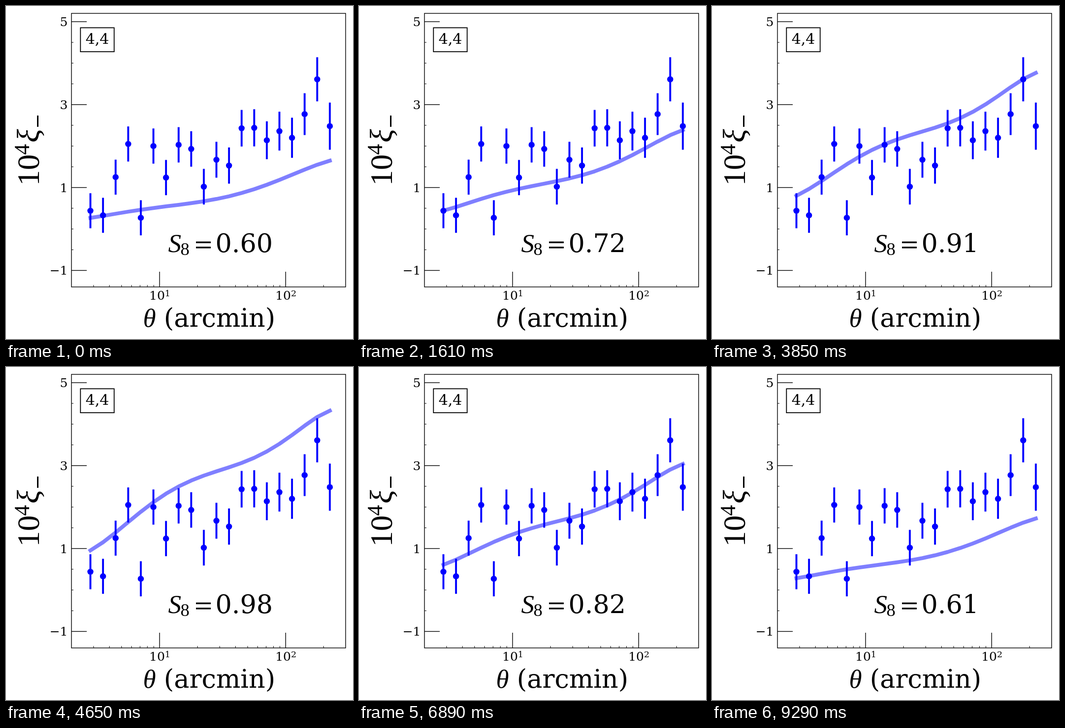
These frames come from a looping animation (705 by 678 pixels, 9450 ms). An HTML page with a canvas:

```html
<!DOCTYPE html>
<html lang="en">
<head>
<meta charset="utf-8">
<title>Correlation function against S8</title>
<style>
  html, body { margin: 0; width: 100%; height: 100%; overflow: hidden; background: #fff; }
  canvas { display: block; }
</style>
</head>
<body>
<canvas id="plot" width="705" height="678"></canvas>
<script>
const ctx = document.getElementById('plot').getContext('2d');
const SERIF = '"DejaVu Serif", serif';
const MATH = '"Liberation Serif", serif';

// Timing: a longer first step, then even steps up and back down
const LOOP = 9450, FIRST = 330, STEP = 160, STEPS = 58;
const S8_MIN = 0.6, S8_MAX = 0.99;

const BOX = { l: 133, t: 15, r: 690, b: 572 };
const xOf = theta => 312 + 256.2 * (Math.log10(theta) - 1);
const yOf = v => 454 - 84.42 * v;
const binX = i => 171.5 + 25.6 * i;
const errorBar = i => 35.6 + 12.4 * Math.exp((i - 19) / 3.5);

const data = [0.44, 0.33, 1.25, 2.05, 0.27, 2, 1.24, 2.03, 1.93, 1.02,
  1.67, 1.53, 2.43, 2.44, 2.14, 2.36, 2.2, 2.77, 3.61, 2.48];

// Model: a few key bins at three key steps, joined by polynomials
const keyBins = [0, 2, 6, 10, 14, 17, 19];
const keySteps = [0, 17, 28];
const keyCurves = [
  [0.267, 0.367, 0.545, 0.723, 1.066, 1.433, 1.647],
  [0.634, 0.912, 1.463, 1.812, 2.268, 2.819, 3.139],
  [0.954, 1.386, 2.322, 2.861, 3.34, 3.962, 4.324]
];

// Lagrange polynomial through (xs, ys), evaluated at x
function poly(xs, ys, x) {
  return ys.reduce((sum, y, j) =>
    sum + xs.reduce((p, xm, m) => m === j ? p : p * (x - xm) / (xs[j] - xm), y), 0);
}

const model = (bin, step) =>
  poly(keySteps, keyCurves.map(curve => poly(keyBins, curve, bin)), step);

function text(str, x, y, size, family = SERIF, align = 'left', style = '') {
  ctx.font = `${style} ${size}px ${family}`;
  ctx.textAlign = align;
  ctx.fillText(str, x, y);
}

function line(x1, y1, x2, y2) {
  ctx.beginPath();
  ctx.moveTo(x1, y1);
  ctx.lineTo(x2, y2);
  ctx.stroke();
}

function drawCurve(step) {
  ctx.save();
  ctx.strokeStyle = 'rgba(0,0,255,0.5)';
  ctx.lineWidth = 7.8;
  ctx.lineCap = 'square';
  ctx.lineJoin = 'round';
  ctx.beginPath();
  data.forEach((_, i) => ctx.lineTo(binX(i), yOf(model(i, step))));
  ctx.stroke();
  ctx.restore();
}

function drawPoints() {
  ctx.strokeStyle = ctx.fillStyle = '#00f';
  ctx.lineWidth = 3.9;
  data.forEach((v, i) => {
    const x = binX(i), y = yOf(v), e = errorBar(i);
    line(x, y - e, x, y + e);
    ctx.beginPath();
    ctx.arc(x, y, 6.2, 0, 2 * Math.PI);
    ctx.fill();
  });
}

function drawAxes() {
  ctx.strokeStyle = ctx.fillStyle = '#000';
  ctx.lineWidth = 1.4;
  ctx.strokeRect(BOX.l, BOX.t, BOX.r - BOX.l, BOX.b - BOX.t);

  for (let v = -1; v <= 5; v += 0.5) {
    const y = yOf(v), major = (v + 1) % 2 === 0;
    ctx.lineWidth = major ? 1.4 : 1;
    line(BOX.l, y, BOX.l + (major ? 31 : 4), y);
    if (major) text(String(v).replace('-', '\u2212'), 125.5, y + 9, 25, SERIF, 'right');
  }
  for (const decade of [1, 10, 100]) {
    for (let m = 1; m < 10; m++) {
      const theta = m * decade;
      if (theta < 3 || theta > 200) continue;
      const x = xOf(theta), major = m === 1;
      ctx.lineWidth = major ? 1.4 : 1;
      line(x, BOX.b, x, BOX.b - (major ? 31 : 4));
      if (major) {
        text('10', x - 21, 598, 25);
        text(String(Math.log10(theta)), x + 10.8, 590.5, 17.5);
      }
    }
  }
}

function drawLabels(s8) {
  ctx.lineWidth = 1.8;
  ctx.strokeRect(151.3, 44.3, 68.4, 48.8);
  text('4,4', 185.6, 77, 30, SERIF, 'center');

  text('S', 329.5, 500.5, 53, MATH, 'left', 'italic');
  text('8', 354.5, 507, 36.5, MATH);
  ctx.fillRect(386, 479.5, 30, 3.4);
  ctx.fillRect(386, 490, 30, 3.4);
  text(s8.toFixed(2), 425.5, 500.5, 52.3);

  text('\u03b8', 278.5, 653, 53, MATH, 'left', 'italic');
  text('(arcmin)', 320.8, 653, 52.3);

  ctx.save();
  ctx.translate(67, 366);
  ctx.rotate(-Math.PI / 2);
  text('10', 0, 0, 64, MATH);
  text('4', 63, -20.5, 44, MATH);
  text('\u03be', 88, 0, 64, MATH, 'left', 'italic');
  ctx.fillRect(120, -4, 23, 3);
  ctx.restore();
}

function draw(now) {
  const t = now % LOOP;
  const n = t < FIRST ? 0 : 1 + Math.floor((t - FIRST) / STEP);
  const step = Math.min(n, STEPS - n);
  ctx.fillStyle = '#fff';
  ctx.fillRect(0, 0, 705, 678);
  drawCurve(step);
  drawPoints();
  drawAxes();
  drawLabels(S8_MIN + (S8_MAX - S8_MIN) * step / (STEPS / 2));
}

let start = null;
function tick(now) {
  if (start === null) start = now;
  draw(now - start);
  requestAnimationFrame(tick);
}
draw(0);
requestAnimationFrame(tick);
</script>
</body>
</html>
```
